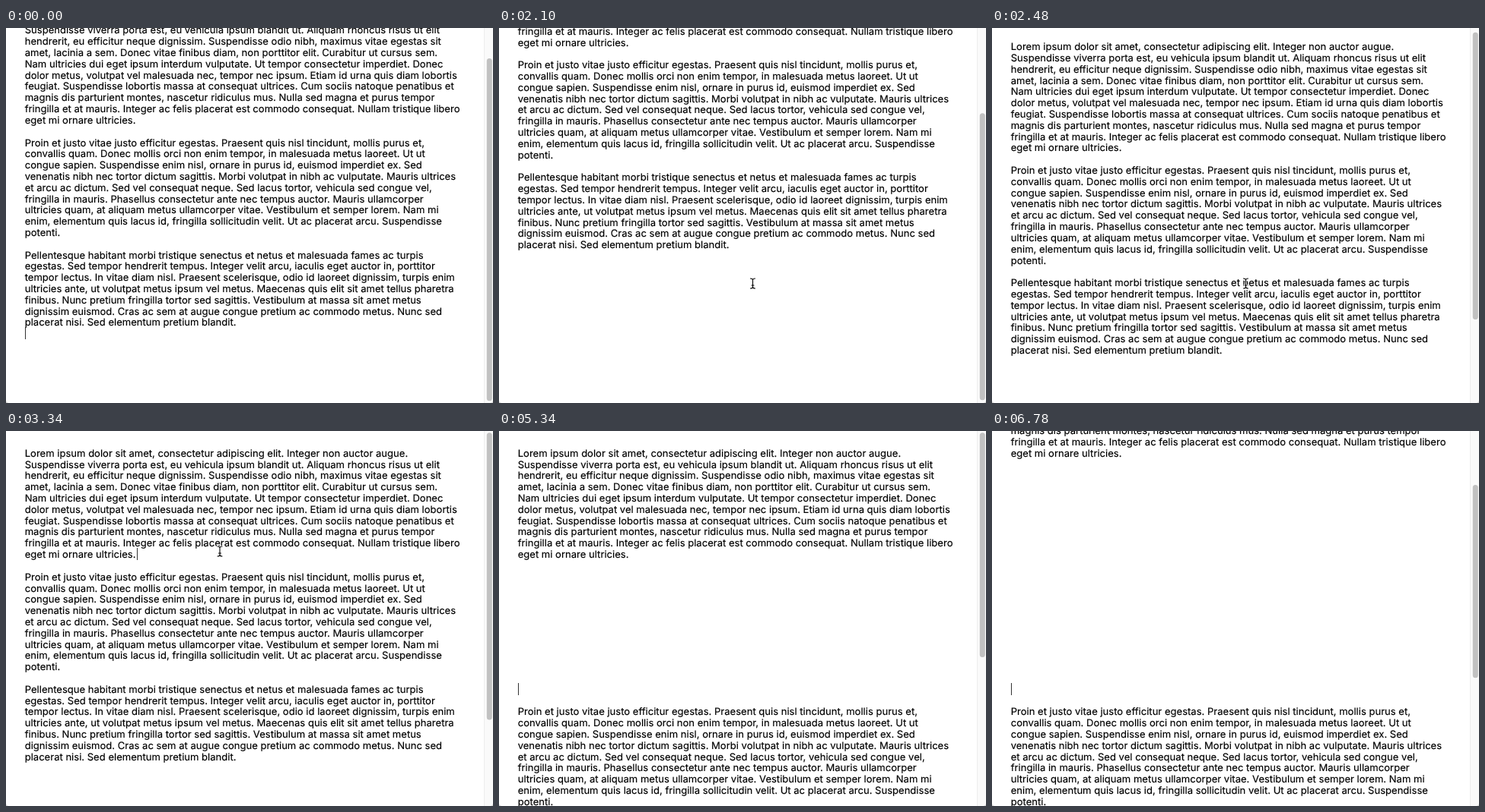
Recreate the animation shown at these times as an HTML page. Size 640 by 494 pixels, loop 6.96 s.

```html
<!DOCTYPE html>
<html lang="en">
<head>
<meta charset="utf-8">
<title>Typewriter scrolling</title>
<style>
  html, body { margin: 0; width: 100%; height: 100%; overflow: hidden; background: #fff; }
  svg { display: block; width: 100vw; height: 100vh; }
  text {
    font: 13.06px Inter, Roboto, sans-serif;
    fill: #000; stroke: #000; stroke-width: .15;
    white-space: pre; text-rendering: geometricPrecision;
  }
</style>
</head>
<body>
<svg id="stage" viewBox="0 0 640 494">
  <rect width="640" height="494" fill="#fff"/>
  <g id="page"></g>
  <rect id="caret" width="1" height="16" fill="#333"/>
  <rect x="628" width="12" height="494" fill="#fafafa"/>
  <rect x="628" width="1" height="494" fill="#ededed"/>
  <rect id="thumb" x="631.8" width="7" rx="3.5" fill="#c1c1c1"/>
  <path d="M0 490A4 4 0 0 0 4 494H0ZM640 490A4 4 0 0 1 636 494H640Z" fill="#d0d0d0"/>
  <g id="mouse" fill="none" stroke-linecap="round">
    <use href="#beam" stroke="#fff" stroke-width="2.6"/>
    <use href="#beam" stroke="#000" stroke-width="1.1"/>
  </g>
  <defs>
    <path id="beam" d="M-3 -6.5Q0 -6.5 0 -4.5Q0 -6.5 3 -6.5M0 -4.5V4.5M-3 6.5Q0 6.5 0 4.5Q0 6.5 3 6.5M-1.5 2.5H1.5"/>
  </defs>
</svg>
<script>
const LOOP = 6960, LINE = 14.81, VIEW = 494, TRACK = 489;
const BASE = 33.8, LEFT = 24.7, BODY = 535.2;

const paragraphs = [`Lorem ipsum dolor sit amet, consectetur adipiscing elit. Integer non auctor augue.
Suspendisse viverra porta est, eu vehicula ipsum blandit ut. Aliquam rhoncus risus ut elit
hendrerit, eu efficitur neque dignissim. Suspendisse odio nibh, maximus vitae egestas sit
amet, lacinia a sem. Donec vitae finibus diam, non porttitor elit. Curabitur ut cursus sem.
Nam ultricies dui eget ipsum interdum vulputate. Ut tempor consectetur imperdiet. Donec
dolor metus, volutpat vel malesuada nec, tempor nec ipsum. Etiam id urna quis diam lobortis
feugiat. Suspendisse lobortis massa at consequat ultrices. Cum sociis natoque penatibus et
magnis dis parturient montes, nascetur ridiculus mus. Nulla sed magna et purus tempor
fringilla et at mauris. Integer ac felis placerat est commodo consequat. Nullam tristique libero
eget mi ornare ultricies.`,
`Proin et justo vitae justo efficitur egestas. Praesent quis nisl tincidunt, mollis purus et,
convallis quam. Donec mollis orci non enim tempor, in malesuada metus laoreet. Ut ut
congue sapien. Suspendisse enim nisl, ornare in purus id, euismod imperdiet ex. Sed
venenatis nibh nec tortor dictum sagittis. Morbi volutpat in nibh ac vulputate. Mauris ultrices
et arcu ac dictum. Sed vel consequat neque. Sed lacus tortor, vehicula sed congue vel,
fringilla in mauris. Phasellus consectetur ante nec tempus auctor. Mauris ullamcorper
ultricies quam, at aliquam metus ullamcorper vitae. Vestibulum et semper lorem. Nam mi
enim, elementum quis lacus id, fringilla sollicitudin velit. Ut ac placerat arcu. Suspendisse
potenti.`,
`Pellentesque habitant morbi tristique senectus et netus et malesuada fames ac turpis
egestas. Sed tempor hendrerit tempus. Integer velit arcu, iaculis eget auctor in, porttitor
tempor lectus. In vitae diam nisl. Praesent scelerisque, odio id laoreet dignissim, turpis enim
ultricies ante, ut volutpat metus ipsum vel metus. Maecenas quis elit sit amet tellus pharetra
finibus. Nunc pretium fringilla tortor sed sagittis. Vestibulum at massa sit amet metus
dignissim euismod. Cras ac sem at augue congue pretium ac commodo metus. Nunc sed
placerat nisi. Sed elementum pretium blandit.`];

// Times at which Return is pressed: at the end of the text, then after the first paragraph
const endKeys = [200, 380, 560, 740, 920, 1100, 1260];
const midKeys = [3600, 3760, 3900, 4040, 4180, 4360, 4500, 4660, 4820, 4980, 5160,
  5340, 5500, 5660, 5800, 5960, 6120, 6280, 6440, 6620, 6780];
const FREE = 12; // returns before the view starts to follow the caret

// Key points: [time, value]
const flick = [[2080, 144.9], [2100, 144], [2140, 125], [2200, 82], [2280, 38.6], [2340, 20],
  [2420, 8], [2520, 2.5], [2680, 0]];
const mouseX = [[1900, 338], [2040, 333.5], [2700, 333.5], [3140, 281]];
const mouseY = [[1900, 342], [2040, 336.5], [2700, 336.5], [3140, 158.5]];

const $ = id => document.getElementById(id);
const set = (el, attrs) => { for (const k in attrs) el.setAttribute(k, attrs[k]); };
const pressed = (keys, t) => keys.filter(k => t >= k).length;
const smooth = p => p * p * (3 - 2 * p);
const linear = p => p;

function at(points, t, ease = linear) {
  if (t <= points[0][0]) return points[0][1];
  for (let i = 1; i < points.length; i++) {
    const [t0, a] = points[i - 1], [t1, b] = points[i];
    if (t < t1) return a + (b - a) * ease((t - t0) / (t1 - t0));
  }
  return points[points.length - 1][1];
}

const page = $("page"), caret = $("caret"), thumb = $("thumb"), mouse = $("mouse");

let row = 0;
const blocks = paragraphs.map(p => {
  const g = document.createElementNS(page.namespaceURI, "g");
  for (const line of p.split("\n")) {
    const text = document.createElementNS(page.namespaceURI, "text");
    text.textContent = line;
    set(text, { x: LEFT, y: BASE + LINE * row++ });
    g.append(text);
  }
  row++;
  return page.appendChild(g);
});

function draw(t) {
  const tail = pressed(endKeys, t), gap = pressed(midKeys, t);
  const height = BODY + (tail + gap) * LINE;
  const scroll = t < 2080 ? height - VIEW
    : t < 2700 ? at(flick, t)
    : Math.max(0, gap - FREE) * LINE;

  set(page, { transform: `translate(0 ${-scroll})` });
  blocks.forEach((b, i) => set(b, { transform: `translate(0 ${i ? gap * LINE : 0})` }));

  const caretRow = t < 2700 ? 28 + tail : 9 + gap;
  set(caret, {
    x: t >= 2700 && !gap ? 172 : 25,
    y: Math.round(BASE - 13 + caretRow * LINE - scroll),
    visibility: t < 1640 || t >= 3340 ? "visible" : "hidden"
  });
  set(thumb, { y: 2.3 + scroll * TRACK / height, height: VIEW * TRACK / height });
  set(mouse, {
    transform: `translate(${at(mouseX, t, smooth)} ${at(mouseY, t, smooth)})`,
    visibility: t >= 1900 && t < 3640 ? "visible" : "hidden"
  });
}

function tick(now) {
  draw(now % LOOP);
  requestAnimationFrame(tick);
}
draw(0);
requestAnimationFrame(tick);
</script>
</body>
</html>
```
